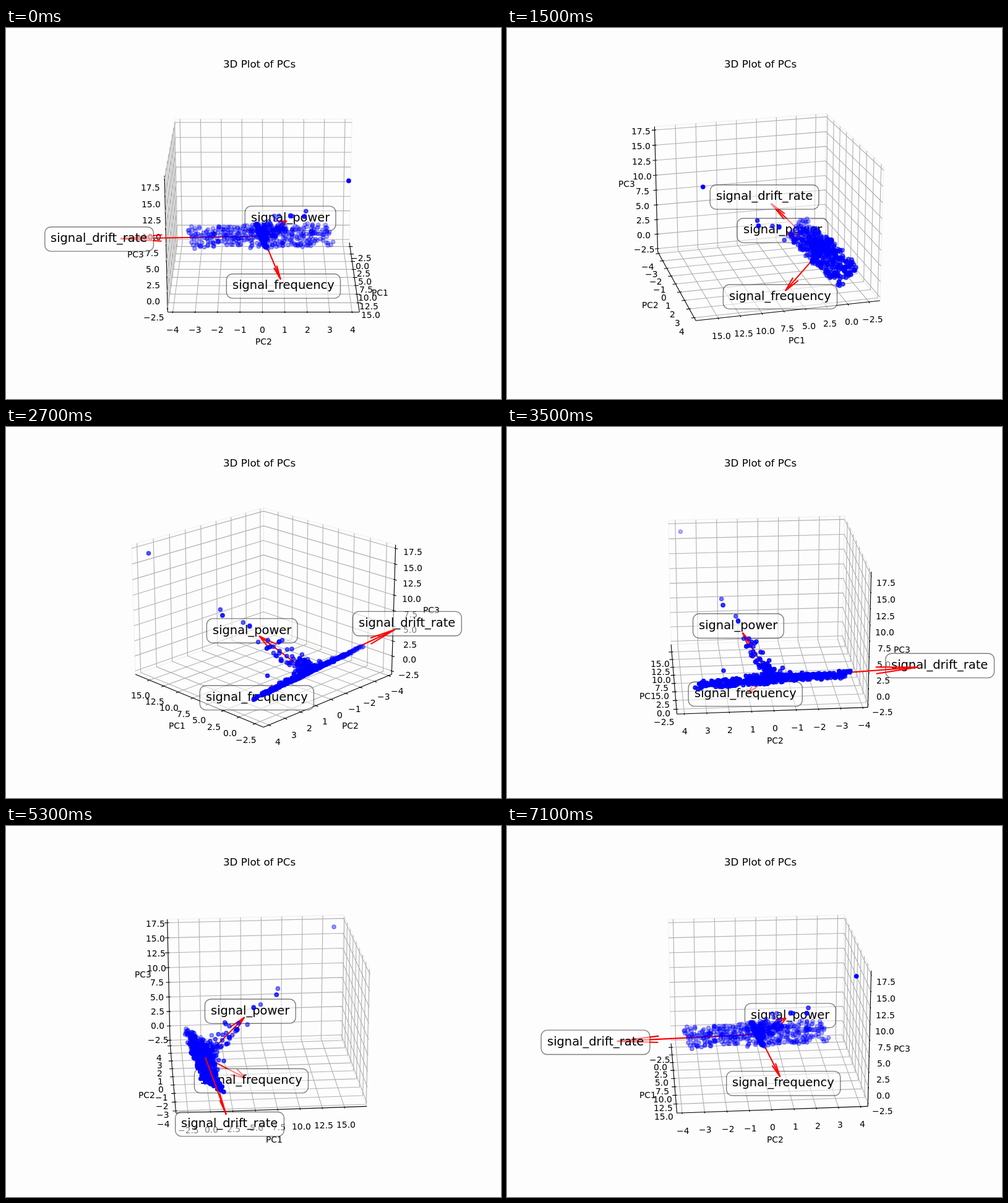
Write an HTML page with a canvas that moves like this. It is 800x600 px and loops after 7200 ms.

```html
<!DOCTYPE html>
<html lang="en">
<head>
<meta charset="utf-8">
<title>3D Plot of PCs</title>
<style>
  html, body { margin: 0; width: 100%; height: 100%; overflow: hidden; background: #fdfdfd; }
  canvas { display: block; }
</style>
</head>
<body>
<canvas id="plot" width="800" height="600"></canvas>
<script>
const ctx = document.getElementById('plot').getContext('2d');
const FONT = '"DejaVu Sans", sans-serif';
const PT = 100 / 72;
const ELEV = 20 * Math.PI / 180, SIN_E = Math.sin(ELEV), COS_E = Math.cos(ELEV);

// The box runs from -1 to 1 on each axis; HALF holds its half sizes in view units.
const HALF = [0.59524, 0.59524, 0.44643];
const MID = [6.85, 0.05, 7.5], SPAN = [21.35, 8.56, 21.13];
const range = (from, to, step) =>
  Array.from({ length: Math.round((to - from) / step) + 1 }, (_, i) => from + i * step);
const axes = [
  { name: 'PC1', ticks: range(-2.5, 15, 2.5), digits: 1 },
  { name: 'PC2', ticks: range(-4, 4, 1), digits: 0 },
  { name: 'PC3', ticks: range(-2.5, 17.5, 2.5), digits: 1 },
];
const toUnit = p => p.map((v, i) => (v - MID[i]) / SPAN[i] * 2);

const arrows = [
  { name: 'signal_frequency', v: [4.86, 0.87, -4.85] },
  { name: 'signal_drift_rate', v: [1.35, -6.86, 0.25] },
  { name: 'signal_power', v: [4.83, 1.14, 5.0] },
];

// Head strokes: the shaft turned by +-15 degrees about a horizontal axis, at 30% length.
function headEnd(v, angle) {
  const [x, y, z] = v, n = Math.hypot(x, y);
  const c = Math.cos(angle), s = Math.sin(angle);
  const flat = (n * c + z * s) / n;
  const turned = [x * flat, y * flat, z * c - n * s];
  return v.map((t, i) => t - 0.3 * turned[i]);
}
for (const a of arrows) {
  a.points = [[0, 0, 0], a.v, headEnd(a.v, Math.PI / 12), headEnd(a.v, -Math.PI / 12)].map(toUnit);
  a.anchor = toUnit(a.v.map(t => t * 1.15));
}

let seed = 7;
function rand() {
  seed = (seed * 1664525 + 1013904223) % 4294967296;
  return seed / 4294967296;
}
const between = (a, b) => a + (b - a) * rand();
const gauss = () => Math.sqrt(-2 * Math.log(1 - rand())) * Math.cos(2 * Math.PI * rand());
const expo = mean => -mean * Math.log(1 - rand());
const anyFreq = () => between(-1.95, 1.75) + 0.12 * gauss();

const points = [];
function addPoint(power, freq, drift) {
  const c = [freq, drift, power];
  points.push(toUnit([0, 1, 2].map(i => arrows.reduce((s, a, k) => s + c[k] * a.v[i] / 7, 0))));
}
for (let i = 0; i < 340; i++) addPoint(between(-0.35, -0.1), anyFreq(), between(-3.45, 3.55));
for (let i = 0; i < 180; i++) addPoint(between(-0.35, -0.1), between(-2.15, 1.95), 0.04 * gauss());
for (let i = 0; i < 60; i++) addPoint(Math.min(2, expo(0.45)) - 0.3, between(-1.8, 1.6), 0.9 * gauss() - 0.5);
for (let i = 0; i < 90; i++) addPoint(Math.min(5.3, expo(1.6)) - 0.2, between(-1.5, 1), 0.1 * gauss());
[[23.4, 0.05, 0.05], [12.5, 0.5, 0.1], [11.7, 1.05, 0.1], [11.7, 1.02, 0.1], [9.6, 0.2, 0.2],
 [8.7, -0.1, 0.1], [8.8, -0.2, 0.1], [6.4, 1.05, 0.1], [6, -0.1, 0.1]].forEach(p => addPoint(...p));

let sinA, cosA;
function project(q) {
  const [x, y, z] = q.map((v, i) => v * HALF[i]);
  const toward = cosA * x + sinA * y;
  const depth = 10 - COS_E * toward - SIN_E * z;
  const k = 2497.3 / depth;
  return [416.2 + k * (cosA * y - sinA * x), 296.8 - k * (COS_E * z - SIN_E * toward), depth];
}

const put = (q, i, v) => q.map((t, k) => k === i ? v : t);
const snap = v => Math.floor(v) + 0.5;

// Level and upright lines sit on whole pixels.
function path(list, color, width, close) {
  const spots = list.map(project);
  const same = i => spots.every((p, n) => !n || Math.abs(p[i] - spots[n - 1][i]) < 0.01);
  const level = same(1), upright = same(0);
  ctx.beginPath();
  for (const [x, y] of spots) ctx.lineTo(upright ? snap(x) : x, level ? snap(y) : y);
  if (close) ctx.closePath();
  ctx.strokeStyle = color;
  ctx.lineWidth = width * PT;
  ctx.stroke();
}

// Text is centred on x and starts on a whole pixel.
function text(str, x, y, size) {
  ctx.font = `${size * PT}px ${FONT}`;
  ctx.fillStyle = '#000';
  ctx.fillText(str, Math.round(x - ctx.measureText(str).width / 2), Math.round(y));
}

function drawAxis(axis, i, far) {
  const out = i === 0 ? 1 : 0;
  const edge = put(far, out, -far[out]);
  const outward = (q, amount) => q.map((t, k) => k === i ? t : t * amount);
  path([put(edge, i, -1), put(edge, i, 1)], '#000', 0.8);
  const [nx, ny] = project(outward(put(edge, i, 0), 1.2886));
  text(axis.name, nx, ny + 4, 10);

  const [j, k] = [0, 1, 2].filter(n => n !== i);
  const spots = axis.ticks.map(t => (t - MID[i]) / SPAN[i] * 2);
  for (const u of spots) {
    const corner = put(far, i, u);
    path([put(corner, j, -far[j]), corner, put(corner, k, -far[k])], '#b0b0b0', 0.8);
  }
  spots.forEach((u, n) => {
    const at = put(edge, i, u);
    path([put(at, out, at[out] * 0.984), put(at, out, at[out] * 1.032)], '#000', 0.8);
    const [x, y] = project(outward(at, 1.1328));
    text(axis.ticks[n].toFixed(axis.digits).replace('-', '\u2212'), x, y + 11, 10);
  });
}

function drawArrow(a) {
  const [tail, tip, left, right] = a.points;
  path([tail, tip], '#f00', 1.5);
  path([tip, left], '#f00', 1.5);
  path([tip, right], '#f00', 1.5);
}

function drawScatter(dots) {
  const near = dots[dots.length - 1][2], reach = dots[0][2] - near;
  ctx.fillStyle = ctx.strokeStyle = '#00f';
  ctx.lineWidth = PT;
  for (const [x, y, depth] of dots) {
    ctx.globalAlpha = 1 - 0.7 * (depth - near) / reach;
    ctx.beginPath();
    ctx.arc(x, y, 3.1, 0, 2 * Math.PI);
    ctx.fill();
    ctx.stroke();
  }
  ctx.globalAlpha = 1;
}

function drawTag(a) {
  const [x, y] = project(a.anchor);
  ctx.font = `${14 * PT}px ${FONT}`;
  const w = ctx.measureText(a.name).width + 19.4, h = 39.4;
  ctx.beginPath();
  ctx.roundRect(x - w / 2, y - h / 2, w, h, 9.7);
  ctx.fillStyle = 'rgba(255,255,255,0.5)';
  ctx.fill();
  ctx.strokeStyle = 'rgba(0,0,0,0.5)';
  ctx.lineWidth = PT;
  ctx.stroke();
  text(a.name, x, y + 5, 14);
}

function draw(azimuth) {
  const angle = azimuth * Math.PI / 180;
  sinA = Math.sin(angle);
  cosA = Math.cos(angle);
  const far = [cosA >= 0 ? -1 : 1, sinA >= 0 ? -1 : 1, -1];

  ctx.fillStyle = '#fdfdfd';
  ctx.fillRect(0, 0, 800, 600);
  ctx.lineJoin = 'round';

  for (let i = 0; i < 3; i++) {
    const [j, k] = [0, 1, 2].filter(n => n !== i);
    const corners = [[-1, -1], [1, -1], [1, 1], [-1, 1]];
    path(corners.map(([a, b]) => put(put(far, j, a), k, b)), '#f0f0f0', 0.8, true);
  }
  axes.forEach((axis, i) => drawAxis(axis, i, far));

  // Layers go back to front by their nearest point; tags sit above the rearmost one.
  const dots = points.map(project).sort((a, b) => b[2] - a[2]);
  const layers = [
    { depth: dots[dots.length - 1][2], paint: () => drawScatter(dots) },
    ...arrows.map(a => ({
      depth: Math.min(...a.points.map(q => project(q)[2])),
      paint: () => drawArrow(a),
    })),
  ].sort((a, b) => b.depth - a.depth);
  layers.forEach((layer, i) => {
    layer.paint();
    if (i === 0) arrows.forEach(drawTag);
  });

  text('3D Plot of PCs', 410, 63.7, 12);
}

let shown = -1;
function tick() {
  const step = Math.floor(performance.now() / 100) % 72;
  if (step !== shown) draw(step * 5);
  shown = step;
  requestAnimationFrame(tick);
}
tick();
</script>
</body>
</html>
```
